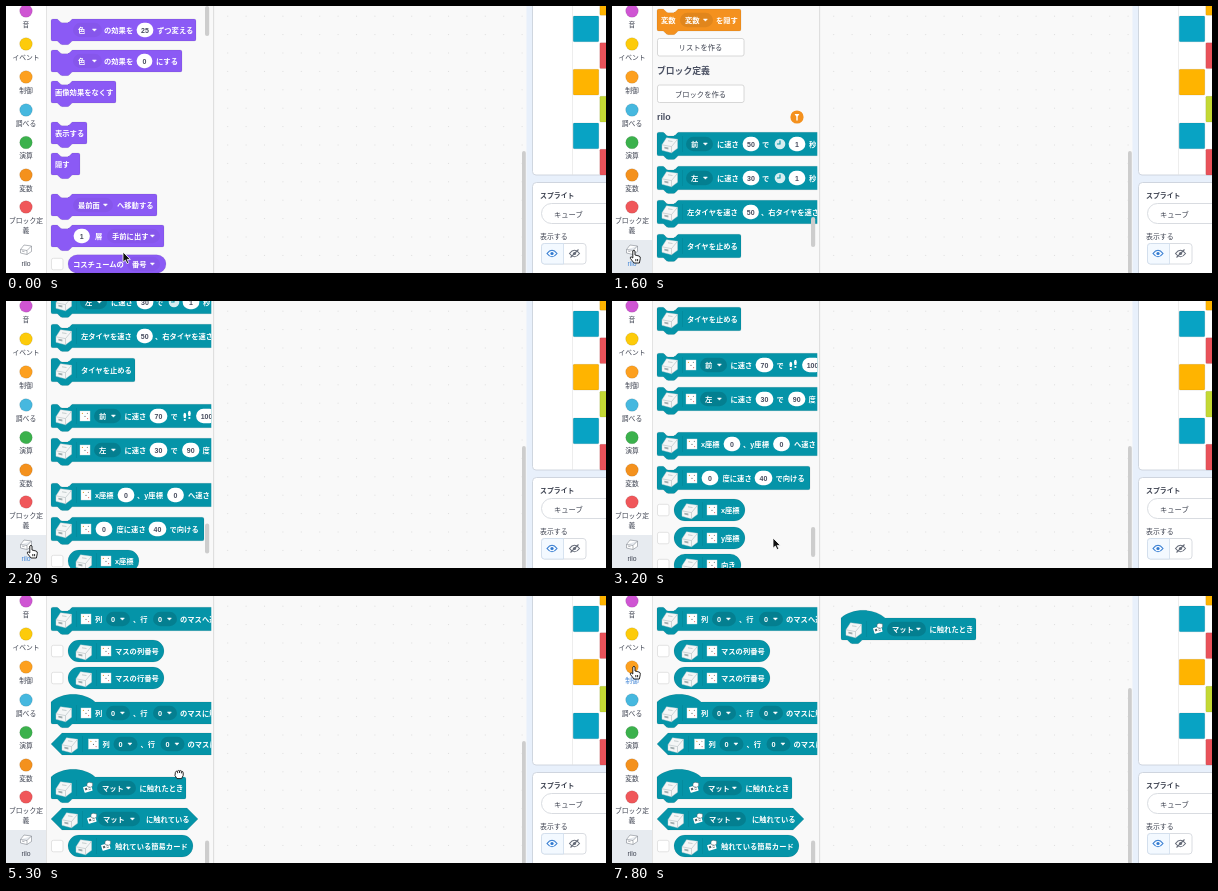
An HTML page for the animation above (8 s loop, 600 by 267 pixels).

```html
<!DOCTYPE html>
<html lang="ja">
<head>
<meta charset="utf-8">
<style>
html, body { margin: 0; width: 100%; height: 100%; overflow: hidden; background: #f9f9f9; }
svg { display: block; width: 100vw; height: 100vh; }
text { font-family: "Liberation Sans", "Noto Sans CJK JP", "Noto Sans CJK", sans-serif; font-size: 7.3px; fill: #3d4250; }
.b text { fill: #fff; font-weight: 700; }
.b .num text { fill: #474c5e; font-size: 7px; }
.head { font-size: 8.8px; font-weight: 700; fill: #4a5062; }
.cat text { font-size: 6.8px; text-anchor: middle; }
.cat .hot { fill: #3f84d6; }
.mid { text-anchor: middle; }
</style>
</head>
<body>
<svg id="stage" viewBox="0 0 600 267"></svg>
<script>
const LOOKS = '#8b5af5', ROBOT = '#0594a8', VARS = '#f4911e';
const U = 0.46;      // pixels per block unit
const LOW = 3150;    // list position of the variables section

const rect = (x, y, w, h, fill, more = '') =>
  `<rect x="${x}" y="${y}" width="${w}" height="${h}" fill="${fill}" ${more}/>`;
const text = (x, y, s, more = '') => `<text x="${x}" y="${y}" ${more}>${s}</text>`;
const path = (d, fill, more = '') => `<path d="${d}" fill="${fill}" ${more}/>`;
const at = (x, y, s, more = '') => `<g transform="translate(${x} ${y})" ${more}>${s}</g>`;
const circle = (x, y, r, fill, more = '') => `<circle cx="${x}" cy="${y}" r="${r}" fill="${fill}" ${more}/>`;

// Parts inside a block, placed on its centre line
const txt = (x, s) => text(x, 2.7, s);
const num = (x, w, s) => `<g class="num">${rect(x - 0.4, -7.2, w + 0.8, 14.4, '#fff', 'rx="7.2"')}` +
  text(x + w / 2, 2.5, s, 'class="mid"') + '</g>';
const menu = (x, w, s, dark = 0.14) =>
  rect(x, -7.2, w, 14.4, '#000', `fill-opacity="${dark}" rx="7.2"`) + txt(x + 5, s) +
  path(`M${x + w - 9.6} -1h4l-2 2.2z`, '#fff', 'stroke="#fff" stroke-width=".5" stroke-linejoin="round"');
const cube = x => at(x, 0.8,
  path('M-8 0L-3.5 -7L7.5 -5.5L7.5 3.5L1.5 8L-8 5.5z', '#f4f6f6', 'stroke="#c9d2d3" stroke-width=".4"') +
  path('M-8 0L1.5 1.8L7.5 -5.5M1.5 1.8V8', 'none', 'stroke="#b3bdbf" stroke-width=".6"') +
  path('M-5.6 2l4 .8v1.8l-4 -.8z', '#a3aeb0') + path('M-2 -4l4.5 .7', 'none', 'stroke="#b9c3c5" stroke-width=".8"'));
const mat = x => at(x, 0, rect(-5, -5, 10, 10, '#fff', 'stroke="#d5dedf" stroke-width=".4"') +
  [[-2.6, -2.6, '#e0a23c'], [2.4, -2.6, '#8b999c'], [0, 0.4, '#68787c'], [2.6, 2.6, '#df6a6a']]
    .map(p => circle(p[0], p[1], 0.6, p[2])).join(''));
const card = x => at(x, 0, '<g transform="rotate(-16)">' +
  rect(-4.6, -2.2, 8.4, 6, '#fff', 'rx=".6"') + rect(-3.2, -0.6, 2.2, 2.2, '#53676c') +
  path('M.2 0h2.4M.2 1.8h2.4', 'none', 'stroke="#53676c" stroke-width=".6"') + '</g>' +
  path('M-1 -4.6l2 -1.2l3.6 .8v3l-2 1.2l-3.6 -.8z', '#fff', 'stroke="#53676c" stroke-width=".5"'));
const clock = x => circle(x, 0, 5.3, '#d6edf0') + path(`M${x} -3.6V0h-3`, 'none', 'stroke="#0594a8" stroke-width="1.1"');
const feet = x => [-2.2, 2.4].map((d, i) => `<ellipse cx="${x + d}" cy="${i * -2 - 0.6}" rx="1.4" ry="2.7" fill="#fff"/>` +
  circle(x + d, i * -2 + 4, 1.1, '#fff')).join('');

const NOTCH = 'c2 0 3 1 4 2l4 4c1 1 2 2 4 2h12c2 0 3 -1 4 -2l4 -4c1 -1 2 -2 4 -2';
const TAB = 'c-2 0 -3 1 -4 2l-4 4c-1 1 -2 2 -4 2h-12c-2 0 -3 -1 -4 -2l-4 -4c-1 -1 -2 -2 -4 -2';

function outline(kind, w, h) {
  const m = h / 2;
  if (kind === 'round') return `M${m} 0H${w - m}a${m} ${m} 0 0 1 0 ${h}H${m}a${m} ${m} 0 0 1 0 ${-h}z`;
  if (kind === 'hex') return `M${m} 0H${w - m}L${w} ${m}L${w - m} ${h}H${m}L0 ${m}z`;
  const top = kind === 'hat' ? 'M0 0c25 -22 71 -22 96 0' : 'M0 4a4 4 0 0 1 4 -4H12' + NOTCH;
  return `${top}H${w - 4}a4 4 0 0 1 4 4V${h - 4}a4 4 0 0 1 -4 4H48${TAB}H4a4 4 0 0 1 -4 -4z`;
}

function block(kind, color, x, end, y, h, ...parts) {
  const shape = `<g transform="translate(${x} ${-h / 2}) scale(${U})">` +
    path(outline(kind, (end - x) / U, h / U), color, 'stroke="#000" stroke-opacity=".14" stroke-width="1.2"') + '</g>';
  const box = kind === 'round' ? rect(45.5, -5.7, 11.5, 11.5, '#fff', 'rx="1.8" stroke="#dcdcdc" stroke-width=".8"') : '';
  return at(0, y, box + shape + parts.join(''), 'class="b"');
}

const looks = (y, end, ...p) => block('stack', LOOKS, 45, end, y, 22, ...p);
const sep = x => rect(x, -8, 0.5, 16, '#000', 'fill-opacity=".12"');
const robot = (y, end, ...p) => block('stack', ROBOT, 45, end, y, 23.6, cube(58), sep(70.5), ...p);
const hat = (y, end, ...p) => block('hat', ROBOT, 45, end, y, 22.2, cube(58), sep(70.5), ...p);
const hex = (y, end, ...p) => block('hex', ROBOT, 45, end, y, 22, cube(64), sep(76.5), ...p);
const value = (y, end, ...p) => block('round', ROBOT, 62, end, y, 22, cube(78), sep(90.5), ...p);
const effect = txt(98, 'の効果を');
const tint = menu(67, 29, '色', 0.04);
const cell = (d, tail) => [mat(80 + d), txt(89 + d, '列'), menu(100 + d, 24, '0'), txt(127 + d, '、行'),
  menu(147 + d, 24, '0'), txt(174 + d, tail)];
const timed = (dir, v) => [menu(74, 27, dir), txt(105, 'に速さ'), num(131, 16, v), txt(150, 'で'),
  clock(168), num(177, 16, '1'), txt(197, '秒')];
const ranged = (dir, v) => [mat(79), menu(88, 27, dir), txt(118.5, 'に速さ'), num(144, 17, v), txt(164.5, 'で')];
const button = (y, s) => rect(45.5, y, 86.5, 17.5, '#fff', 'rx="2" stroke="#cfcfcf" stroke-width=".8"') +
  text(88.5, y + 11.5, s, 'class="mid"');

const touched = y => hat(y, 180, card(82), menu(91, 39, 'マット'), txt(133.5, 'に触れたとき'));

const upper = [
  looks(24, 190, tint, effect, num(131, 16, '25'), txt(151, 'ずつ変える')),
  looks(55, 176, tint, effect, num(131, 15, '0'), txt(150, 'にする')),
  looks(86, 110, txt(49, '画像効果をなくす')),
  looks(127, 81, txt(49, '表示する')),
  looks(158, 74, txt(49, '隠す')),
  looks(199, 151, menu(67, 40, '最前面', 0.04), txt(111, 'へ移動する')),
  looks(230, 158, num(68, 15.5, '1'), txt(89, '層'), menu(101, 53, '手前に出す', 0.04)),
  block('round', LOOKS, 62, 160, 258, 18.4, txt(67, 'コスチュームの'), menu(121, 33, '番号', 0.04))
].join('');

const lower = [
  block('stack', VARS, 45, 129, 14, 22, txt(49, '変数'), menu(68, 33, '変数', 0.08), txt(104, 'を隠す')),
  button(32.5, 'リストを作る'),
  text(45, 67.5, 'ブロック定義', 'class="head"'),
  button(79, 'ブロックを作る'),
  text(45, 114.3, 'rilo', 'class="head"'),
  circle(185, 111, 6.6, VARS), path('M182.6 108h4.8l-1.7 2.6v3.8h-1.4v-3.8z', '#fff'),
  robot(138, 215, ...timed('前', '50')),
  robot(172, 215, ...timed('左', '30')),
  robot(206, 230, txt(75, '左タイヤを速さ'), num(131, 15.5, '50'), txt(149, '、右タイヤを速さ')),
  robot(240, 129, txt(75, 'タイヤを止める')),
  robot(286, 225, ...ranged('前', '70'), feet(181), num(190.5, 20, '100')),
  robot(320, 215, ...ranged('左', '30'), num(176.5, 16.5, '90'), txt(196.5, '度')),
  robot(365, 230, mat(80), txt(89, 'x座標'), num(112, 16, '0'), txt(131, '、y座標'), num(161.5, 16, '0'), txt(182, 'へ速さ')),
  robot(399, 198, mat(80), num(90, 16, '0'), txt(110.5, '度に速さ'), num(143, 17, '40'), txt(163.5, 'で向ける')),
  value(431, 133, mat(100), txt(109, 'x座標')),
  value(459, 133, mat(100), txt(109, 'y座標')),
  value(486, 129, mat(100), txt(109, '向き')),
  robot(524, 230, ...cell(0, 'のマスへ速さ')),
  value(556, 158, mat(100), txt(109, 'マスの列番号')),
  value(583, 158, mat(100), txt(109, 'マスの行番号')),
  hat(618, 230, ...cell(0, 'のマスに触れたとき')),
  hex(649, 245, ...cell(7.5, 'のマスに触れている')),
  touched(693),
  hex(724, 192, card(86), menu(92, 42, 'マット'), txt(140, 'に触れている')),
  value(751, 187, card(100), txt(109, '触れている簡易カード'))
].join('');

const cats = [['音', 5, '#cf55d3'], ['イベント', 38, '#fdcb0a'], ['制御', 71, '#fda01f'], ['調べる', 104, '#46b8df'],
  ['演算', 136.5, '#3bb14c'], ['変数', 169, '#f4911d'], ['ブロック定', 201, '#f0575a']];
const column = rect(0, 0, 40, 267, '#fff') + rect(0, 234, 40, 33, '#e7ebf0', 'id="pick"') + '<g class="cat">' +
  cats.map(([s, y, c], i) => circle(20, y, 6.3, c, 'stroke="#000" stroke-opacity=".12" stroke-width=".8"') +
    text(20, y + 15.5, s, `id="cat${i}"`)).join('') + text(20, 227.3, '義') +
  at(20, 243.5, path('M-5.5 0L-2 -4.5L5.5 -3.5V2L1 5L-5.5 3.5z M-5.5 0L1 1L5.5 -3.5M1 1V5M-4 1.6l2.5 .6', '#fff',
    'stroke="#81868f" stroke-width=".6"')) +
  text(20, 259.5, 'rilo', 'id="cat7"') + '</g>' + rect(40, 0, 0.8, 267, '#dedede');

const tile = (x, y, c) => rect(x, y, 25.6, 25.8, c, 'rx="1" stroke="#000" stroke-opacity=".14" stroke-width=".6"');
const panel = rect(520.5, 0, 80, 267, '#e8f0fb') +
  path('M526.5 -5V165.5a3.5 3.5 0 0 0 3.5 3.5H606V-5z', '#fff', 'stroke="#cbd2dc" stroke-width=".9"') +
  rect(566, 0, 0.6, 169, '#e2e2e2') +
  tile(567.2, 10, '#08a3c4') + tile(567.2, 63.3, '#ffb400') + tile(567.2, 117, '#08a3c4') +
  tile(593.8, -16.5, '#ffb400') + tile(593.8, 36.8, '#e9525a') + tile(593.8, 90.3, '#c4d934') + tile(593.8, 143.3, '#e9525a') +
  rect(526.5, 176.5, 90, 100, '#fff', 'rx="4" stroke="#cbd2dc" stroke-width=".9"') +
  text(534, 191.7, 'スプライト', 'style="font-size:6.9px;font-weight:700"') +
  rect(535.5, 197.5, 90, 20, '#fff', 'rx="10" stroke="#d5d8de" stroke-width=".9"') +
  text(548, 210.5, 'キューブ') + text(534, 232.5, '表示する', 'style="font-size:6.9px"') +
  rect(535.5, 237.5, 44.5, 20.5, '#fff', 'rx="3" stroke="#d5d8de" stroke-width=".9"') +
  path('M557.5 237.5H538.5a3 3 0 0 0 -3 3v14.5a3 3 0 0 0 3 3h19z', '#f3f9ff', 'stroke="#cfdcec" stroke-width=".8"') +
  [[546, '#3079d0'], [568.5, '#666c79']].map(([x, c]) =>
    path(`M${x - 5} 247.5q5 -6.5 10 0q-5 6.5 -10 0z`, 'none', `stroke="${c}" stroke-width="1.1"`) + circle(x, 247.5, 1.6, c)).join('') +
  path('M564.5 251.5l8 -8', 'none', 'stroke="#666c79" stroke-width="1.1"');

const ink = 'stroke="#111" stroke-width=".9" stroke-linejoin="round"';
const pointers = {
  arrow: path('M0 0V10.2L2.4 8L4 11.6L5.8 10.8L4.2 7.4H7.4z', '#111', 'stroke="#fff" stroke-width=".8"'),
  point: path('M-1.2 -4q1.2 -1.4 2.2 0V0l4 1q1.6 .5 1.3 2.4L5.4 8H0L-3.6 3.4q-.5 -1.7 1 -1.4L-1.2 3z', '#fff', ink) +
    path('M1.8 4v2.2M3.6 4v2.2', 'none', ink),
  open: path('M-3 1V-3q.8 -1.2 1.6 0q.2 -2.4 1.7 -1.4q1.6 -.8 1.8 .9q1.6 -.6 1.7 1V2L2.6 5.4H-2L-5 1.4q0 -1.5 2 -.4z', '#fff', ink) +
    path('M-1.4 -3v3M.3 -4v4M2.1 -3.4v3.4', 'none', ink),
  shut: path('M-3.6 -1.6q.6 -1.9 2.2 -1.2q1 -1.4 2 -.3q1.4 -.7 2 .4q1.6 0 1.6 1.6V1.4L2.6 4.6H-2L-4 1.6z', '#fff', ink) +
    path('M-1.4 -2.6v1.8M.5 -3v2M2.4 -2.4v1.8', 'none', ink)
};

const stage = document.getElementById('stage');
stage.innerHTML = '<defs><clipPath id="list"><rect x="41" y="0" width="164.3" height="267"/></clipPath>' +
  '<pattern id="dots" x="212.5" y="1" width="18.4" height="18.4" patternUnits="userSpaceOnUse">' +
  circle(9.2, 9.2, 0.6, '#d9d9d9') + '</pattern></defs>' +
  rect(0, 0, 600, 267, '#f9f9f9') + rect(208, 0, 310, 267, 'url(#dots)') +
  rect(516, 145, 3.8, 130, '#cdcdcd', 'rx="1.9" id="bar"') + panel +
  rect(41, 0, 166.5, 267, '#f9f9f9') + rect(207.2, 0, 0.9, 267, '#d9d9d9') +
  `<g clip-path="url(#list)"><g id="scroll">${upper}${at(0, LOW, lower)}</g></g>` +
  rect(199, 0, 4.2, 30, '#cdcdcd', 'rx="2.1" id="thumb"') + column +
  `<g id="copy">${touched(0)}</g><g id="mouse">` +
  Object.keys(pointers).map(k => `<g id="${k}">${pointers[k]}</g>`).join('') + '</g>';

const $ = id => document.getElementById(id);
const move = (id, x, y) => $(id).setAttribute('transform', `translate(${x} ${y})`);
const smooth = u => u * u * (3 - 2 * u);

// Keys are [time, ...values]
function track(keys, t, ease = u => u) {
  const n = keys.findIndex(k => k[0] > t);
  if (n < 0) return keys[keys.length - 1].slice(1);
  if (!n) return keys[0].slice(1);
  const a = keys[n - 1], b = keys[n], u = ease((t - a[0]) / (b[0] - a[0]));
  return a.slice(1).map((v, i) => v + (b[i + 1] - v) * u);
}

const REST = LOW + 171, END = LOW + 501;
const scrollKeys = [[1500, 0], [1600, LOW], [1700, REST - 20], [1800, REST - 2], [1900, REST], [3100, REST],
  [3200, REST + 51], [3400, REST + 185], [3600, REST + 290], [3700, REST + 312], [3900, END]];
const mouseKeys = [[400, 117, 246], [900, 24, 247], [1300, 24, 247], [1600, 22, 249], [2200, 25, 249], [2600, 25, 249],
  [2900, 161, 237], [4300, 161, 237], [4800, 167, 191], [5200, 167, 191], [5300, 173, 178], [5900, 351, 32],
  [6300, 351, 32], [6600, 332, 48], [7000, 332, 48], [7800, 22, 75]];
const dragKeys = [[5300, 0, 192], [5900, 184, 33]];

function cursor(t, x) {
  if (x < 41) return 'point';
  if (t >= 5300 && t < 6400) return 'shut';
  const over = (t >= 2900 && t < 3200) || (t >= 3400 && t < 5300);
  return over ? 'open' : 'arrow';
}

function draw(t) {
  const [top] = track(scrollKeys, t);
  move('scroll', 0, -top);
  $('thumb').setAttribute('y', 0.067 * top);

  const [dx, dy] = track(dragKeys, t, smooth);
  move('copy', dx, dy);
  $('copy').style.display = t > 5300 ? '' : 'none';
  const barTop = t >= 5900 ? 92 : 145;
  $('bar').setAttribute('y', barTop);
  $('bar').setAttribute('height', 275 - barTop);

  const [x, y] = track(mouseKeys, t, smooth);
  move('mouse', x, y);
  const kind = cursor(t, x);
  for (const k in pointers) $(k).style.display = k === kind ? '' : 'none';
  $('pick').style.display = t >= 1500 ? '' : 'none';
  $('cat2').classList.toggle('hot', x < 41 && y < 100);
  $('cat7').classList.toggle('hot', x < 41 && y > 230);
}

function tick(now) {
  draw(Math.floor(now % 8000 / 100) * 100);
  requestAnimationFrame(tick);
}
draw(0);
requestAnimationFrame(tick);
</script>
</body>
</html>
```
